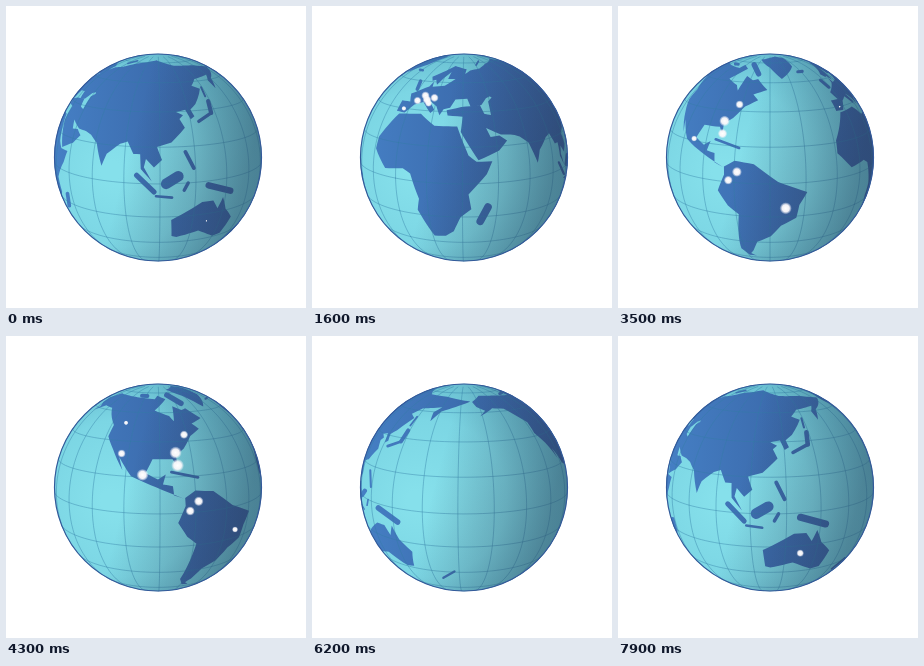
Write an HTML page with a canvas that moves like this. It is 300 by 302 pixels and loops after 8000 ms.

```html
<!DOCTYPE html>
<html lang="en">
<head>
<meta charset="utf-8">
<title>Turning globe</title>
<style>
html, body { margin: 0; width: 100%; height: 100%; overflow: hidden; background: #fff; }
canvas { display: block; }
</style>
</head>
<body>
<canvas id="stage" width="300" height="302"></canvas>
<script>
const ctx = document.getElementById('stage').getContext('2d');
const CX = 152, CY = 151.5, R = 104, EYE = 8, LOOP = 8000, STEP = 100;
const RAD = Math.PI / 180, TILT = 13 * RAD;
const sinTilt = Math.sin(TILT), cosTilt = Math.cos(TILT);

// Rough coastlines as longitude, latitude pairs.
const europe = [60,69, 44,67, 38,64, 40,68, 25,71, 13,65, 5,61, 8,58, 11,59, 14,55.5, 18,61,
  23,65.5, 22,60, 29,60, 21,55, 11,54, 10,57.5, 8,54, -4.5,48.3, -1.5,43.5, -9,43.5, -9,37,
  -2,36.8, 3,42, 9,44, 16,38, 18,40, 13,45.5, 19,42, 22,37, 24,40.5, 28,41.5, 31,46.5,
  39,47, 41,42, 48,43, 52,47, 60,50];
const westAsia = [26,40, 35,42, 47,43, 49,38, 53,37, 53,45, 60,50, 75,50, 75,30, 66,25.3,
  57,26, 49,30, 51,25, 56,25.5, 60,22.5, 55,17.5, 44,12.8, 35,28, 36,36.5, 27,37];
const asia = [58,69, 70,72.5, 104,77.5, 130,71, 160,70, 190,66, 178,62.5, 163,58, 157,51,
  156,57, 162,61, 142,59, 135,54.5, 141,52, 132,43, 127.5,40, 129,36, 126.3,34.5, 124,40,
  118,39, 122,37, 119.5,35, 122,30, 114,22.3, 106.5,20, 109,13, 105,9, 101,13.5, 100,9,
  104,1.4, 98.5,8, 98,16, 94.5,16, 91,22.5, 87,21, 80,15, 77.5,8, 73,20, 68,24, 62,26,
  60,45, 52,50, 50,60];
const africa = [-6,35.8, 10,37.2, 20,31, 33,31, 39,15.5, 43,12, 51,12, 48,5, 39,-6, 40.5,-15,
  35,-20, 31,-30, 26,-34, 19,-34.5, 12,-17, 13.5,-10, 9,4, 4.5,6.3, -7.5,4.4, -17,14,
  -16.5,21, -9.5,31];
const northAmerica = [-168,65.7, -156,71.2, -128,70, -95,68, -92,71.5, -82,68, -94,59, -82,55,
  -79,51.5, -77,62, -69.5,59, -65,60, -56,52.5, -66,49.5, -62,46, -70,42, -76,35, -81,31.5,
  -80.5,25.5, -83,29.5, -94,29.5, -97.5,22, -91,18.7, -87,21.3, -88.5,16, -83.5,15, -83,10,
  -78,8, -92,14.5, -105,20, -113,30, -110,23, -118,34, -124.3,41, -124,48, -138,59, -150,60,
  -164,54.6, -158,58.5, -165,61.5];
const southAmerica = [-77.5,8.3, -72,12, -62,10.7, -50,1, -35.2,-5.5, -39,-13, -40,-21, -48,-26,
  -53.5,-34, -62,-39, -66,-48, -69,-52, -65,-55, -71,-54.5, -75,-47, -70.5,-19, -76,-14,
  -81,-5.5, -77.3,4];
const greenland = [-73,78.3, -35,83.5, -18,80, -23,70, -43,60, -54,69.5];
const australia = [114,-22, 130,-12, 136.5,-12, 140,-17.5, 142.5,-11, 146,-19, 153,-26, 150,-37.5,
  144,-38.5, 131,-31.5, 118,-35, 115,-34];
const lands = [europe, westAsia, asia, africa, northAmerica, southAmerica, greenland, australia];

// Islands as rounded bars: both ends and the thickness, in degrees.
const islands = [
  [49,-14,45.5,-23,5], [133,-2.5,147,-8,4.5], [111,0,117,4,6], [96.5,4.5,105,-4.5,3],
  [106,-7,114,-8,1.5], [120,-4,122,0,2], [121,17,125,8,2.2], [131,33,141,37,2.2],
  [141,37,142.5,44,3], [142,47,143,53,1.5], [-1.5,51.5,-4,57,3], [-22,65,-16,65,3],
  [177,-38.5,168.5,-45.5,2.2], [-84,22.5,-70,19,1.6], [-78,72,-66,64,5], [-114,71,-106,71,4],
  [55,72,65,76,2]
];

// City lights: longitude, latitude, radius and, if narrower, the span in which they glow.
const lights = [
  [-4,39,4], [4,44.5,5], [8.5,48,5], [13,43.5,4], [16,47,4.5], [11,45.5,5], [-46,-14.5,6],
  [-70.5,6,5.2], [-75,1,4.8], [-74,43,4.4], [-81,33,6.2], [-80.5,26,6.6,38],
  [-99,21,6], [-112,32,4.4], [-115,50,2.6], [134.5,-25,4.6,28]
];

// Longitude facing the viewer, by second.
const turn = [[0,107], [0.9,71.5], [2.2,7], [3.5,-54], [4.3,-91], [6.2,-177], [8,-246]];
function facing(sec) {
  const i = turn.findIndex(k => k[0] > sec);
  const [t0, a] = turn[i - 1], [t1, b] = turn[i];
  return a + (b - a) * (sec - t0) / (t1 - t0);
}

let center = 0;
const mapLat = lat => lat * (0.9 + 0.1 * (lat / 90) ** 2);

function project(lon, lat) {
  const a = (lon - center) * RAD, p = lat * RAD;
  const x = Math.cos(p) * Math.sin(a), depth = Math.cos(p) * Math.cos(a);
  const y = cosTilt * Math.sin(p) - sinTilt * depth;
  const z = sinTilt * Math.sin(p) + cosTilt * depth;
  const seen = z > 1 / EYE;
  // Hidden points slide onto the rim so that outlines close along it.
  const k = R * (seen ? Math.sqrt(EYE * EYE - 1) / (EYE - z) : 1 / (Math.hypot(x, y) || 1));
  return { x: CX + x * k, y: CY - y * k, z, seen };
}

function disc(x, y, r, fill) {
  ctx.beginPath();
  ctx.arc(x, y, r, 0, 7);
  ctx.fillStyle = fill;
  ctx.fill();
}

function gradient(g, ...stops) {
  stops.forEach(([at, color]) => g.addColorStop(at, color));
  return g;
}

function drawLand(pts) {
  let any = false;
  ctx.beginPath();
  for (let i = 0; i < pts.length; i += 2) {
    const j = (i + 2) % pts.length;
    const dx = pts[j] - pts[i], dy = pts[j + 1] - pts[i + 1];
    const n = Math.ceil(Math.max(Math.abs(dx), Math.abs(dy)) / 3);
    for (let s = 0; s < n; s++) {
      const q = project(pts[i] + dx * s / n, mapLat(pts[i + 1] + dy * s / n));
      any = any || q.seen;
      ctx.lineTo(q.x, q.y);
    }
  }
  if (any) ctx.fill();
}

function drawIsland([lon1, lat1, lon2, lat2, width]) {
  const a = project(lon1, mapLat(lat1)), b = project(lon2, mapLat(lat2));
  if (!a.seen && !b.seen) return;
  ctx.beginPath();
  ctx.moveTo(a.x, a.y);
  ctx.lineTo(b.x, b.y);
  ctx.lineWidth = width * RAD * R * Math.max(0.4, (a.z + b.z) / 2);
  ctx.stroke();
}

function drawLine(from, to, point) {
  let down = false;
  for (let v = from; v <= to; v += 3) {
    const q = point(v);
    if (q.seen) down ? ctx.lineTo(q.x, q.y) : ctx.moveTo(q.x, q.y);
    down = q.seen;
  }
}

function drawGrid() {
  ctx.beginPath();
  for (let lon = 0; lon < 360; lon += 18) drawLine(-81, 81, lat => project(lon, lat));
  for (let lat = -72; lat <= 72; lat += 18) drawLine(0, 360, lon => project(lon, lat));
  ctx.strokeStyle = 'rgba(50,125,165,.42)';
  ctx.lineWidth = 1;
  ctx.stroke();
}

function drawLight([lon, lat, size, span = 52]) {
  const q = project(lon, mapLat(lat));
  const off = Math.abs(((lon - center + 540) % 360 + 360) % 360 - 180);
  if (!q.seen || off >= span) return;
  const r = size * Math.sqrt(1 - (off / span) ** 2);
  disc(q.x, q.y, r, gradient(ctx.createRadialGradient(q.x, q.y, 0, q.x, q.y, r),
    [0, '#fff'], [0.6, 'rgba(250,248,250,.95)'], [1, 'rgba(240,240,250,.1)']));
}

const ocean = gradient(ctx.createRadialGradient(105, 165, 10, 125, 160, 135),
  [0, '#86e0eb'], [0.55, '#7cd6e4'], [1, '#5fb2c6']);
const land = gradient(ctx.createLinearGradient(50, 0, 255, 0), [0, '#457fc4'], [0.5, '#3c6cae'], [1, '#375f9c']);
const shade = gradient(ctx.createLinearGradient(125, 138, 240, 168),
  [0, 'rgba(35,45,65,0)'], [0.5, 'rgba(35,45,65,.2)'], [1, 'rgba(35,45,65,.38)']);

function draw(now) {
  center = facing(Math.floor(now % LOOP / STEP) * STEP / 1000);
  ctx.fillStyle = '#fff';
  ctx.fillRect(0, 0, 300, 302);
  ctx.save();
  ctx.beginPath();
  ctx.arc(CX, CY, R, 0, 7);
  ctx.clip();
  disc(CX, CY, R, ocean);
  ctx.fillStyle = ctx.strokeStyle = land;
  ctx.lineCap = 'round';
  lands.forEach(drawLand);
  islands.forEach(drawIsland);
  drawGrid();
  disc(CX, CY, R, shade);
  lights.forEach(drawLight);
  ctx.restore();
  ctx.beginPath();
  ctx.arc(CX, CY, R - 0.5, 0, 7);
  ctx.strokeStyle = '#34599a';
  ctx.lineWidth = 1.2;
  ctx.stroke();
}

const start = performance.now();
function tick() {
  draw(performance.now() - start);
  requestAnimationFrame(tick);
}
tick();
</script>
</body>
</html>
```
